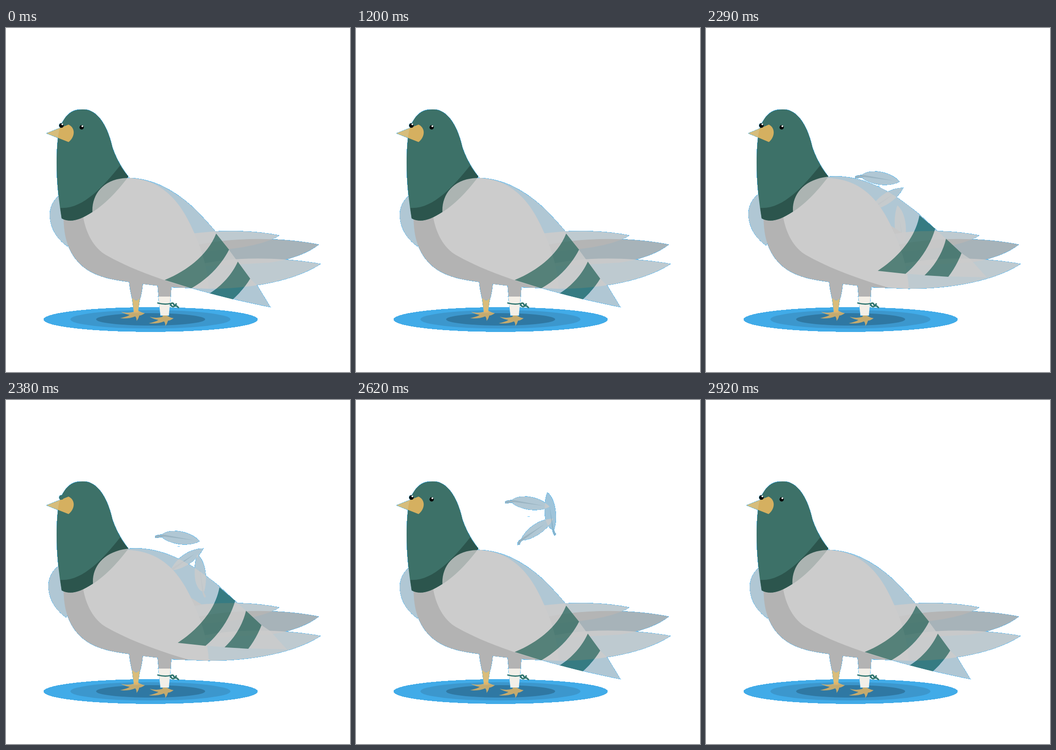
Write an HTML page that moves like this. It is 748 px wide and 748 px high and loops after 3.05 s.

```html
<!DOCTYPE html>
<html lang="en">
<head>
<meta charset="utf-8">
<title>Pigeon</title>
<style>
html, body { margin: 0; width: 100%; height: 100%; overflow: hidden; background: #fff; }
svg { display: block; width: 100vw; height: 100vh; }
.matte { fill: #40b4f8; stroke: #40b4f8; stroke-width: 1.1; shape-rendering: crispEdges; }
.pale { fill: #ccc; }
.soft { fill: #ccc; fill-opacity: .8; }
.grey { fill: #b3b3b3; }
.tail { fill-opacity: .9; }
.stripe { fill: #346c62; fill-opacity: .78; }
.green { fill: #3d7168; }
.beak { fill: #fcc05e; fill-opacity: .8; }
.foot { fill: #e6b563; fill-opacity: .82; }
.vein { fill: #9ab4c2; }
</style>
</head>
<body>
<svg viewBox="0 0 748 748">
  <defs>
    <path id="head" d="M121 414C113 365 106 300 113 240C116 205 135 178 160 177.500Q168 176.500 177 178C204 184.500 222.500 219 231.500 260C240 285 252 305 266 323C235 365 205 390 188 400C160 418 140 424 121 414Z"/>
    <path id="collar" d="M118 391C165 395 210 347 248 299Q256 312 266 323C235 365 205 390 188 400C160 418 140 424 121 414Z"/>
    <path id="beak" d="M88 229L136 210C151 217 151 236 136 248Z"/>
    <path id="chest" d="M116 364C98 378 92 400 97 422C102 446 118 464 134 475L150 440L130 370Z"/>
    <path id="body" d="M125 412C126 445 130 465 142 488C162 524 195 540 240 548C290 556 340 563 395 565L410 447C385 390 350 330 265 326L188 380Z"/>
    <path id="side" d="M168 412C174 445 190 478 218 494C270 523 330 545 395 564L441 567Q438 510 410 447C385 390 350 330 265 326L188 398Q178 406 168 412Z"/>
    <path id="tailFar" d="M400 447.500C470 438 540 440 594 451C570 467 520 480 430 486L400 490Z"/>
    <path id="tailMid" d="M400 473L425 470C500 455 600 455 680 471C655 490 620 503 575 510L400 520Z"/>
    <path id="tailNear" d="M430 512C500 497 600 498 684 513C630 548 540 567 440 567L365 564Z"/>
    <path id="wing" d="M188 402C185.500 361 213 326 268 326C330 328 380 365 410 393C430 413 445 430 455 442L531 545L547 561L575 607C500 592 420 572 345 548C290 528 240 508 215 487C200 470 190 430 188 402Z"/>
    <path id="stripes" d="M457 447C440 490 400 525 345 548L403 566C440 545 468 515 485 482ZM504 508C492 535 470 560 443 577L493 590C508 577 522 560 531 545Z"/>
    <path id="legs" d="M267 545L298 550Q296 575 291 591H275Q270 575 267 545ZM329 552L360 555L358 585H332Z"/>
    <path id="shin" d="M274 587Q283 596 291 588L287 618H278Z"/>
    <path id="band" d="M331 584H358L354 625H336Z"/>
    <path id="foot" d="M278 614H287Q294 619 302 620Q294 626 290 625Q288 632 284 637Q284 630 281 627Q266 633 248 631Q262 628 269 624Q258 622 250 617Q264 621 278 617Z"/>
    <path id="blade0" d="M337 259C345 249 360 249 372 249C395 251 412 261 421 271C405 280 380 280 362 274C348 270 340 264 337 259Z"/>
    <path id="blade1" d="M429 290C400 290 370 310 358 337C380 338 415 318 429 290Z"/>
    <path id="blade2" d="M416 270C432 282 440 320 431 350C422 353 413 338 411 322C409 303 411 284 416 270Z"/>
    <path id="vein0" d="M324 260Q332 256 345 257L408 269L345 261Q332 263 325 264Z"/>
    <path id="vein1" d="M352 347L352 341Q355 337 362 332L410 302L364 336Q357 340 356 346Z"/>
    <path id="vein2" d="M435 361L432 364Q428 360 426 346L421 300L429 345Q430 354 435 361Z"/>
    <clipPath id="wingCut"><path clip-rule="evenodd" d="M0 0H748V748H0ZM457 447C440 490 400 525 345 548L403 566C440 545 468 515 485 482ZM504 508C492 535 470 560 443 577L493 590C508 577 522 560 531 545Z"/></clipPath>
  </defs>

  <ellipse cx="314.500" cy="633.900" rx="233" ry="26.900" fill="#41abe8" shape-rendering="crispEdges"/>
  <ellipse cx="314" cy="633.500" rx="174" ry="20" fill="#3c97cd"/>
  <ellipse cx="314.500" cy="633.500" rx="118.500" ry="13.500" fill="#2f78a3"/>

  <g class="matte">
    <g class="feather"><use href="#blade0"/><use href="#vein0"/></g>
    <g class="feather"><use href="#blade1"/><use href="#vein1"/><path d="M373 285.500h5" stroke-width=".8"/></g>
    <g class="feather"><use href="#blade2"/><use href="#vein2"/></g>
    <use href="#chest" class="chest"/>
    <use href="#tailFar"/><use href="#tailMid"/><use href="#tailNear"/>
    <use href="#legs"/><use href="#shin"/><use href="#band"/>
    <use href="#body"/><use href="#head"/>
    <circle cx="120.500" cy="212" r="5"/>
    <use href="#beak" class="bill"/>
    <use href="#wing" class="flap"/>
  </g>

  <g class="feather ink"><use href="#blade0" class="soft"/><use href="#vein0" class="vein"/></g>
  <g class="feather ink"><use href="#blade1" class="soft"/><use href="#vein1" class="vein"/></g>
  <g class="feather ink"><use href="#blade2" class="soft"/><use href="#vein2" class="vein"/></g>

  <use href="#chest" class="soft chest"/>
  <use href="#tailFar" class="pale tail"/>
  <use href="#tailMid" class="grey tail"/>
  <use href="#tailNear" class="pale tail"/>
  <path id="gap" class="grey" d="M402 430L426 445L408 448Z"/>
  <use href="#legs" class="grey"/>
  <use href="#shin" fill="#dabd7a"/>
  <use href="#band" fill="#f3efe8"/>
  <g fill="none" stroke="#2f756f" stroke-width="2.800" stroke-linecap="round" stroke-linejoin="round">
    <path d="M330 598Q345 602 358 599"/>
    <path d="M358 600Q363 596 365 601T370 600M358 602Q362 608 366 605T375 608" stroke-width="3.400"/>
  </g>
  <use href="#foot" class="foot"/>
  <use href="#foot" class="foot" transform="translate(62.500 11)"/>
  <use href="#body" class="grey"/>
  <use href="#side" class="pale"/>
  <use href="#head" class="green"/>
  <use href="#collar" fill="#2c554d"/>
  <g class="flap">
    <use href="#wing" class="soft" clip-path="url(#wingCut)"/>
    <use href="#stripes" class="stripe"/>
  </g>
  <use href="#beak" class="beak bill"/>
  <g class="green"><circle cx="120.500" cy="212" r="5"/><circle cx="164.500" cy="216" r="4.600"/></g>
  <g id="eyes">
    <circle cx="120.500" cy="212" r="4.800"/><circle cx="164.500" cy="216" r="4.700"/>
    <g fill="#fff"><circle cx="122.500" cy="209.500" r="1.900"/><circle cx="166" cy="213.500" r="1.900"/></g>
  </g>
</svg>
<script>
const LOOP = 3050, STEP = 30, START = 2230, END = 2920;
const all = s => [...document.querySelectorAll(s)];
const mattes = all('.matte .feather'), inks = all('.ink');
const flaps = all('.flap'), bills = all('.bill'), chests = all('.chest');
const eyes = document.getElementById('eyes'), gap = document.getElementById('gap');

// Rise of each feather at the key times, and when it begins to fade
const times = [2230, 2380, 2500, 2620, 2740];
const feathers = [
  { y: [81, 36, 0, -39, -57], fade: 2620 },
  { y: [74, 33, 0, -32, -50], fade: 2620 },
  { y: [149, 66, 0, -69, -75], fade: 2567 }
];

const clamp = x => Math.max(0, Math.min(1, x));
const within = (t, a, b) => t >= a && t < b;
const set = (list, value) => list.forEach(el => el.setAttribute('transform', value));
const show = (el, on) => el.setAttribute('visibility', on ? 'visible' : 'hidden');

function rise(ys, t) {
  let i = 0;
  while (i < 3 && t >= times[i + 1]) i++;
  let k = clamp((t - times[i]) / (times[i + 1] - times[i]));
  if (i === 3) k = 1 - (1 - k) ** 2;
  return ys[i] + (ys[i + 1] - ys[i]) * k;
}

function draw(ms) {
  let t = ms % LOOP;
  if (t >= START) t = START + Math.floor((t - START) / STEP) * STEP;
  const up = within(t, START, 2440);
  set(flaps, up ? 'rotate(-11 255 390)' : '');
  set(chests, up ? 'translate(-3 -2)' : '');
  set(bills, within(t, START, 2320) ? 'translate(147 0) scale(.932 1) translate(-147 0)' : '');
  show(gap, up);
  show(eyes, !within(t, 1000, 1200) && !within(t, 2320, 2470));

  feathers.forEach((f, i) => {
    const pair = [mattes[i], inks[i]];
    const on = within(t, START + STEP, END);
    pair.forEach(el => show(el, on));
    if (!on) return;
    set(pair, `translate(0 ${rise(f.y, t)})`);
    const alpha = clamp((t - START) / 60) * clamp((END - t) / (END - f.fade));
    inks[i].setAttribute('opacity', alpha);
  });
}

const begin = performance.now();
function tick() {
  draw(performance.now() - begin);
  requestAnimationFrame(tick);
}
tick();
</script>
</body>
</html>
```
